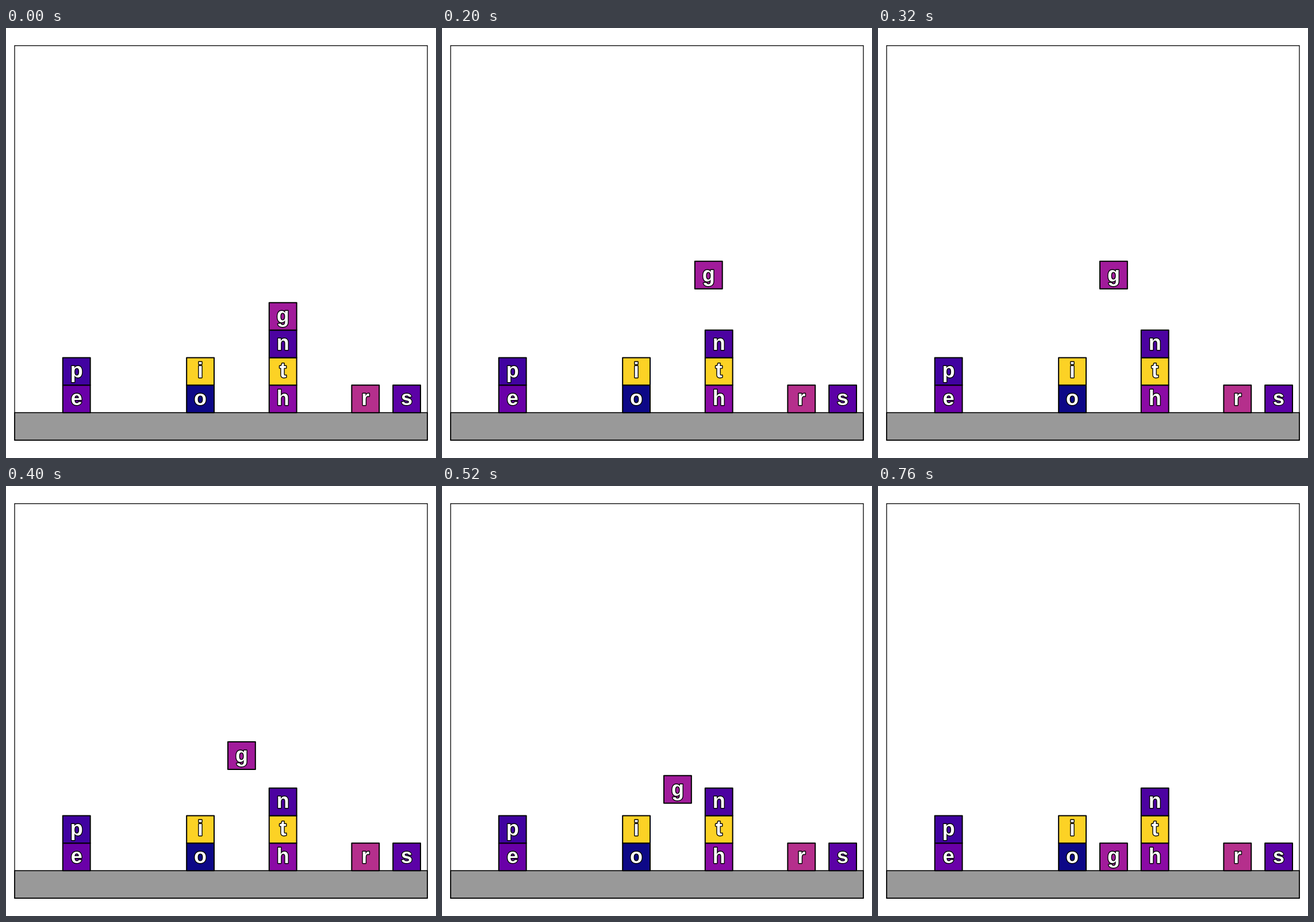
These frames come from a looping animation (748x748 px, 800 ms). An HTML page with a canvas:

```html
<!DOCTYPE html>
<html>
<head>
<meta charset="utf-8">
<title>Letter blocks</title>
<style>
  html, body { margin: 0; width: 100%; height: 100%; overflow: hidden; background: #fff; }
  canvas { display: block; }
</style>
</head>
<body>
<canvas id="stage" width="748" height="748"></canvas>
<script>
const ctx = document.getElementById('stage').getContext('2d');

const LEFT = 15, RIGHT = 733, TOP = 30.7, BOTTOM = 717;
const COLUMN = (RIGHT - LEFT) / 10;
const BLOCK = COLUMN * 2 / 3;
const GROUND = BOTTOM - BLOCK;

const STEP_MS = 40, STEPS = 20;
const LIFT_END = 4, SLIDE_END = 8, DROP_END = 19;

const resting = [
  ['e', 1, 0, '#6a00a8'], ['p', 1, 1, '#4102a1'],
  ['o', 4, 0, '#0d0887'], ['i', 4, 1, '#fcd225'],
  ['h', 6, 0, '#8b0aa5'], ['t', 6, 1, '#fcd225'], ['n', 6, 2, '#4c02a1'],
  ['r', 8, 0, '#b52f8c'], ['s', 9, 0, '#5c01a6']
];

function outlinedRect(x, y, w, h, fill, lineWidth) {
  ctx.lineWidth = lineWidth;
  if (fill) {
    ctx.fillStyle = fill;
    ctx.fillRect(x, y, w, h);
  }
  ctx.strokeRect(x, y, w, h);
}

// column and level count from the lower left; both may be fractional
function drawBlock(letter, column, level, color) {
  const cx = LEFT + (column + 0.5) * COLUMN;
  const cy = GROUND - (level + 0.5) * BLOCK;
  outlinedRect(cx - BLOCK / 2, cy - BLOCK / 2, BLOCK, BLOCK, color, 2);
  ctx.lineWidth = 2.8;
  ctx.strokeText(letter, cx, cy + 10.8);
  ctx.fillStyle = '#fff';
  ctx.fillText(letter, cx, cy + 10.8);
}

const progress = (step, from, to) =>
  Math.min(1, Math.max(0, (step - from) / (to - from)));

function draw(step) {
  ctx.fillStyle = '#fff';
  ctx.fillRect(0, 0, 748, 748);
  ctx.strokeStyle = '#000';
  ctx.lineJoin = 'miter';
  outlinedRect(LEFT, GROUND, RIGHT - LEFT, BLOCK, '#999', 1.6);
  outlinedRect(LEFT, TOP, RIGHT - LEFT, BOTTOM - TOP, null, 1.3);

  ctx.font = 'bold 36px "Liberation Sans", Arial, sans-serif';
  ctx.textAlign = 'center';
  ctx.textBaseline = 'alphabetic';
  ctx.lineJoin = 'round';
  for (const block of resting) drawBlock(...block);

  const column = 6 - progress(step, LIFT_END, SLIDE_END);
  const level = 3 + 1.5 * progress(step, 0, LIFT_END)
                  - 4.5 * progress(step, SLIDE_END, DROP_END);
  drawBlock('g', column, level, '#a11b9b');
}

function tick() {
  draw(Math.floor(performance.now() / STEP_MS) % STEPS);
  requestAnimationFrame(tick);
}
tick();
</script>
</body>
</html>
```
